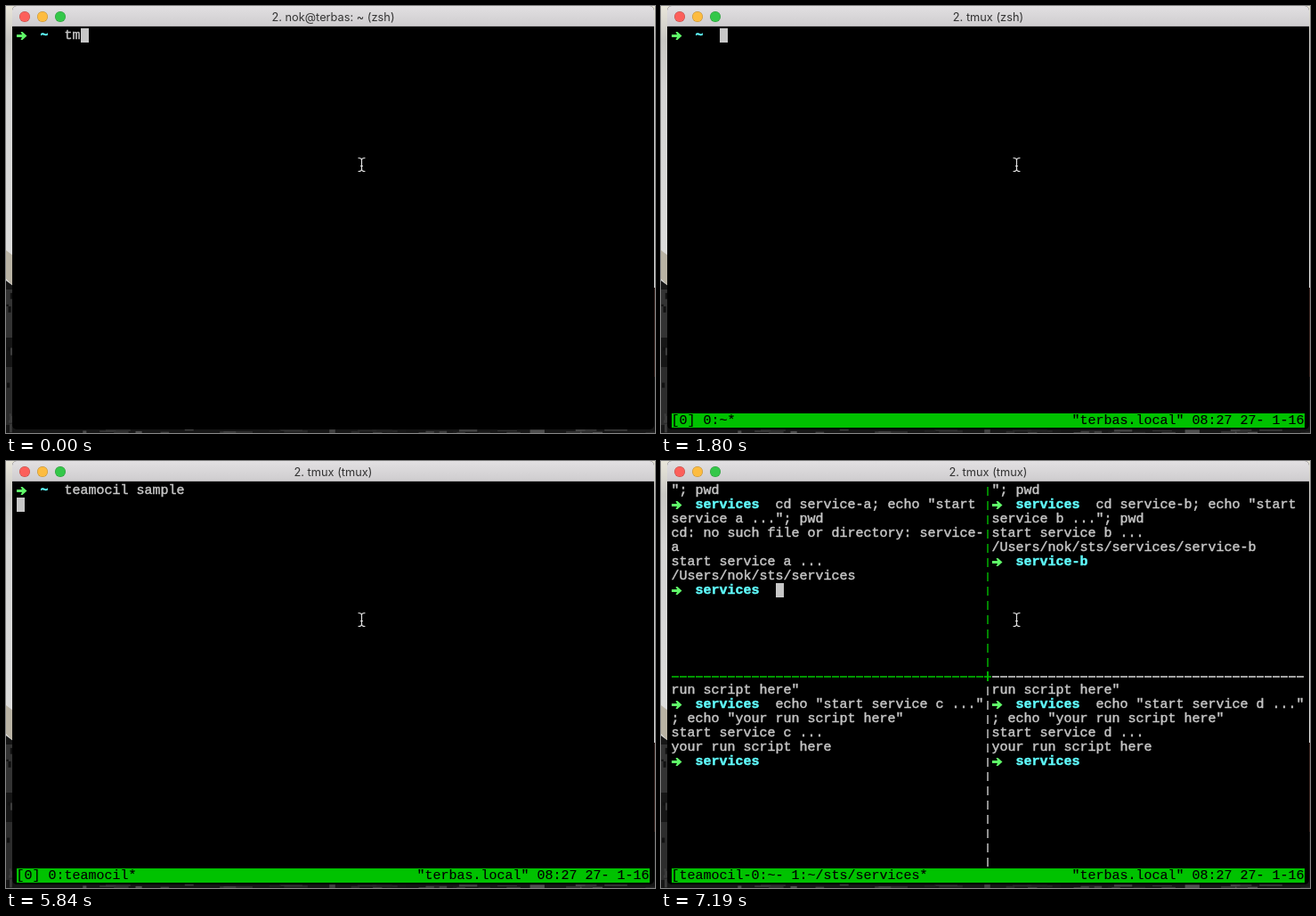
An HTML page for the animation above (8 s loop, 729 by 479 pixels).

```html
<!DOCTYPE html>
<html lang="en">
<head>
<meta charset="utf-8">
<title>Terminal session</title>
<style>
html, body { margin: 0; width: 729px; height: 479px; overflow: hidden; background: #161616; }
body { position: relative; }
svg, div, span { position: absolute; }
#window { left: 7px; top: 0; width: 721px; height: 475px; border-radius: 5px; background: #000; overflow: hidden; }
#bar { width: 721px; height: 23px; box-sizing: border-box; background: linear-gradient(#e2e0e2, #cfcdcf); border-bottom: 1px solid #b4b2b4; }
#bar i { position: absolute; top: 6px; width: 12px; height: 12px; border-radius: 50%; box-shadow: inset 0 0 0 .5px #0004; }
#title { width: 100%; top: 1px; text-align: center; font: 12.8px/23px Inter, Roboto, sans-serif; color: #333; }
#screen { left: 0; top: 0; }
#screen span { white-space: pre; margin-left: -.5px; font: 15px/18px "Liberation Mono", "DejaVu Sans Mono", monospace; color: #c7c7c7; -webkit-text-stroke: .45px; }
#screen .dir { color: #60fdff; font-weight: bold; }
#screen .status { color: #000; -webkit-text-stroke: .15px; }
.cursor { width: 9px; height: 16px; background: #c7c7c7; }
.green { color: #00b000; }
.gray { color: #c0c0c0; }
.vline { left: 366px; width: 2px; height: 208px; opacity: .75; background: repeating-linear-gradient(#0000 0 4px, currentColor 4px 14px, #0000 14px 16px); }
.hline { top: 241px; height: 2px; opacity: .85; background: repeating-linear-gradient(90deg, currentColor 0 8px, #0000 8px 9px); }
</style>
</head>
<body>
<svg width="729" height="479">
  <defs>
    <linearGradient id="wall" x2="0" y2="1">
      <stop stop-color="#e9e6da"/><stop offset=".12" stop-color="#c9c8c4"/>
      <stop offset=".3" stop-color="#d4d4d3"/><stop offset="1" stop-color="#dededd"/>
    </linearGradient>
  </defs>
  <path d="M0 0H729V316H720V30H8V314L0 308Z" fill="url(#wall)"/>
  <path d="M0 274L8 280V314L0 306Z" fill="#b9b3a4"/>
  <g id="rubble"></g>
</svg>
<div id="window">
  <div id="bar">
    <i style="left:8px;background:#fc605b"></i>
    <i style="left:28px;background:#fdbc40"></i>
    <i style="left:48px;background:#34c749"></i>
    <div id="title"></div>
  </div>
</div>
<div id="screen"></div>
<svg width="729" height="479" fill="none" stroke="#e4e4e4" stroke-width="1.2" stroke-linecap="round">
  <path d="M396 170.5Q399.5 170.5 399.5 173V183Q399.5 185.5 396 185.5M403 170.5Q399.5 170.5 399.5 173M399.5 183Q399.5 185.5 403 185.5M398.5 179.5H400.5"/>
</svg>
<script>
const LOOP = 8000;
const screen = document.getElementById('screen');
const title = document.getElementById('title');

// Dark, broken wallpaper visible around the window
let seed = 7;
const rand = n => (seed = seed * 16807 % 2147483647) / 2147483647 * n;
const rect = (x, y, w, h, fill) => `<rect x="${x}" y="${y}" width="${w}" height="${h}" fill="${fill}"/>`;
let bits = rect(0, 318, 7, 54, '#333') + rect(0, 405, 7, 65, '#2c2c2c') + rect(728, 316, 1, 100, '#3a2420');
for (let i = 0; i < 40; i++) {
  const shade = 20 + Math.floor(rand(65));
  bits += rect(rand(729), 475 + rand(3), 4 + rand(24), 1 + rand(3), `rgb(${shade},${shade},${shade})`);
}
for (let i = 0; i < 10; i++) bits += rect(rand(5), 318 + rand(155), 2 + rand(5), 2 + rand(8), i % 2 ? '#111' : '#3c3c3c');
document.getElementById('rubble').innerHTML = bits;

const at = (row, col) => `left:${12 + 9 * col}px;top:${25 + 16 * row}px`;
const put = (row, col, text, cls = '') => `<span class="${cls}" style="${at(row, col)}">${text}</span>`;
const cursor = (row, col) => `<div class="cursor" style="${at(row, col)}"></div>`;
const arrow = (row, col) => `<svg width="12" height="16" style="${at(row, col)}">
  <path d="M0 7H6L4.5 4H6.5L11.5 8.5L6.5 13H4.5L6 10H0Z" fill="#5ffa68"/></svg>`;
const prompt = (row, col, dir, cmd = '') =>
  arrow(row, col) + put(row, col + 3, dir, 'dir') + put(row, col + 5 + dir.length, cmd);
const lines = (row, col, list) => list.map((text, i) => put(row + i, col, text)).join('');
const status = left => `<div style="left:12px;top:457px;width:711px;height:16px;background:#00c200"></div>`
  + put(27, 0, left, 'status') + put(27, 50, '"terbas.local" 08:27 27- 1-16', 'status');

// Typed text as [start time, visible part]
const launch = [[0, 'tm'], [150, 'tmu'], [300, 'tmux']];
const command = [[1800, ''], [2550, 't'], [2700, 'tea'], [2850, 'team'], [3150, 'teamocil '],
  [4350, 'teamocil s'], [4640, 'teamocil sa'], [4790, 'teamocil sample']];
const typed = (steps, t) => steps.filter(s => s[0] <= t).pop()[1];
const typing = text => prompt(0, 0, '~', text) + cursor(0, 6 + text.length);

function service(col, id, path, errors = []) {
  const output = [...errors, `start service ${id} ...`, `/Users/nok/sts/${path}`];
  return prompt(1, col, 'services', `cd service-${id}; echo "start`)
    + put(2, col, `service ${id} ..."; pwd`) + lines(3, col, output)
    + prompt(3 + output.length, col, path.split('/').pop());
}
const script = (col, id) => prompt(15, col, 'services', `echo "start service ${id} ..."`)
  + lines(16, col, ['; echo "your run script here"', `start service ${id} ...`, 'your run script here'])
  + prompt(19, col, 'services');

function panes(t) {
  const ready = t >= 6890;
  let out = `<div class="vline green" style="top:25px"></div><div class="vline gray" style="top:249px"></div>
    <div class="hline green" style="left:12px;width:360px"></div>
    <div class="hline gray" style="left:372px;width:350px"></div>
    <div style="left:366px;top:236px;width:2px;height:11px;background:#00b000"></div>`;
  for (const col of [0, 40]) out += put(0, col, '"; pwd') + put(14, col, 'run script here"');
  if (ready) out += service(40, 'b', 'services/service-b') + script(40, 'd');
  out += t < 7040 ? cursor(1, 0)
    : service(0, 'a', 'services', ['cd: no such file or directory: service-', 'a']) + cursor(7, 13);
  if (t >= 7190) out += script(0, 'c');
  return out + status('[teamocil-0:~- 1:' + (ready ? '~/sts/services*' : 'zsh*'));
}

function view(t) {
  if (t < 900) return typing(typed(launch, t));
  if (t < 1800) return cursor(0, 0) + status('[0] 0:zsh*');
  if (t < 5840) return typing(typed(command, t)) + status('[0] 0:~*');
  if (t < 5990) return prompt(0, 0, '~', 'teamocil sample') + cursor(1, 0) + status('[0] 0:teamocil*');
  return panes(t);
}

let shown;
function draw(now) {
  const t = now % LOOP;
  const html = view(t);
  if (html !== shown) screen.innerHTML = shown = html;
  title.textContent = '2. ' + (t < 1050 ? 'nok@terbas: ~ (zsh)' : t < 1950 ? 'tmux (zsh)' : 'tmux (tmux)');
  requestAnimationFrame(draw);
}
draw(0);
</script>
</body>
</html>
```
